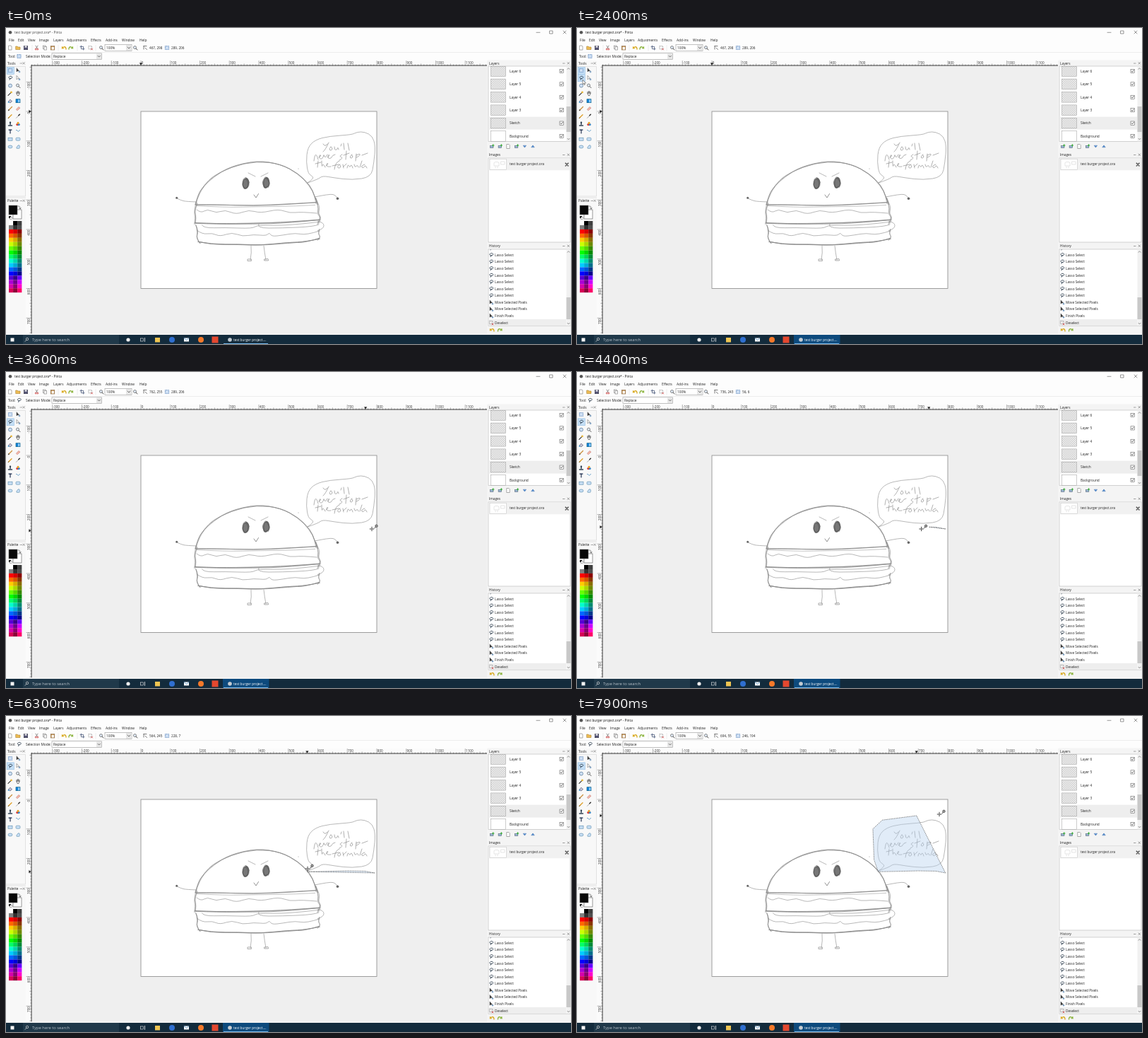
Write an HTML page that moves like this. It is 800 px wide and 447 px high and loops after 8000 ms.

```html
<!DOCTYPE html>
<html lang="en">
<head>
<meta charset="utf-8">
<title>Lasso selection</title>
<style>
html, body { margin: 0; width: 100%; height: 100%; overflow: hidden; background: #efefef; }
svg { display: block; width: 100vw; height: 100vh; }
text { font-family: "Open Sans", "Noto Sans", sans-serif; white-space: pre; }
</style>
</head>
<body>
<svg id="stage" viewBox="0 0 800 447" xmlns="http://www.w3.org/2000/svg"></svg>
<script>
const SCALE = 0.4175, LEFT = 191, TOP = 118;
const px = x => LEFT + x * SCALE, py = y => TOP + y * SCALE;

let seed = 7;
const rnd = () => (seed = seed * 16807 % 2147483647) / 2147483647;

// Markup helpers
const rect = (x, y, w, h, fill, stroke = 'none', sw = .6) =>
  `<rect x="${x}" y="${y}" width="${w}" height="${h}" fill="${fill}" stroke="${stroke}" stroke-width="${sw}"/>`;
const dot = (x, y, r, fill, stroke = 'none') =>
  `<circle cx="${x}" cy="${y}" r="${r}" fill="${fill}" stroke="${stroke}" stroke-width=".7"/>`;
const text = (x, y, str, size = 4.8, fill = '#222', extra = '') =>
  `<text x="${x}" y="${y}" font-size="${size}" fill="${fill}" ${extra}>${str}</text>`;
const path = (d, stroke = '#333', w = .7, fill = 'none') =>
  `<path d="${d}" stroke="${stroke}" stroke-width="${w}" fill="${fill}" stroke-linejoin="round" stroke-linecap="round"/>`;
const at = (x, y, body, id = '') => `<g ${id && `id="${id}"`} transform="translate(${x} ${y})">${body}</g>`;

const parse = s => s.split(' ').map(p => p.split(',').map(Number));
function curve(str, jitter = 0) {
  const p = parse(str).map(([x, y]) => [x + (rnd() - .5) * jitter, y + (rnd() - .5) * jitter]);
  let d = 'M' + p[0];
  for (let i = 1; i < p.length - 1; i++) {
    const end = i < p.length - 2 ? [(p[i][0] + p[i + 1][0]) / 2, (p[i][1] + p[i + 1][1]) / 2] : p[i + 1];
    d += `Q${p[i]} ${end}`;
  }
  return p.length < 3 ? d + 'L' + p[1] : d;
}
function sketch(str, passes = 1, jitter = 0, w = .6, color = '#888') {
  let out = '';
  while (passes--) out += path(curve(str, jitter), color, w);
  return out;
}

// Icons, centred on 0,0
const icon = {
  lasso: path('M-1 2.5 0 .5M0 .7C-4 .5-2-3 1-2.6 4-2 3 1 0 .7', '#234', .8),
  marquee: `<rect x="-2.6" y="-2.4" width="5.2" height="4.8" fill="#cfe0f4" stroke="#36a" stroke-width=".7" stroke-dasharray="1 .6"/>`,
  oval: dot(0, 0, 2.5, '#cfe0f4', '#579'),
  move: path('M-2-3V2L-.7.8 1.5.8Z', '#333', .4, '#333') + path('M1 2H3M2 1V3', '#47a'),
  moveSel: path('M-2-3V2L-.7.8 1.5.8Z', '#555', .5, '#fff') + path('M1 2H3M2 1V3', '#47a'),
  zoom: dot(-.5, -.5, 2, '#e4eefa', '#555') + path('M1 1 3 3', '#555', 1),
  wand: path('M-3 3 1-1', '#333', 1.1) + dot(1.5, -1.5, 1.4, '#e8b83a'),
  pan: path('M-2 0V-2M-.7-.5V-3M.7-.5V-3M2 0V-2M-2 0-1 3H1L2 0Z', '#555', .8, '#fff'),
  bucket: path('M-2 0 0-2 2.5.5 0 2.5Z', '#446', .7, '#ccd') + dot(-2.4, 1.7, .9, '#28c'),
  gradient: rect(-3, -2.5, 6, 5, '#1584d8', '#057') + rect(0, -2, 2.5, 4, '#8cc8f4'),
  brush: path('M-2.5 2.5 2.5-2.5', '#c98b35', 1.2) + dot(-2.2, 2.2, 1, '#555'),
  eraser: path('M-2.5 1 1-2.5 3-.8-.8 2.6Z', '#b66', .5, '#f3b9a8'),
  pencil: path('M-2.5 2.5 2-2', '#e0a22e', 1.4) + path('M-2.8 2.8-2 2', '#333', .8),
  picker: path('M-2.5 2.5 1-1', '#aaa', 1) + path('M.8-1 2.4-2.6', '#333', 1.5),
  stamp: path('M-2.5 2.5H2.5M0 1V-2', '#345', 1.5) + dot(0, -1.8, 1.2, '#345'),
  recolor: dot(-1, 1, 1.7, '#d33') + dot(1.2, 1, 1.6, '#38c') + dot(0, -1.2, 1.6, '#e9a52a'),
  type: path('M-2-2.3H2M0-2.3V2.5', '#124', 1.1),
  line: path('M-2.5-2C0-3-1 3 2.5-2', '#48b', .8),
  box: rect(-3, -2, 6, 4, '#c9dff5', '#58a'),
  round: `<rect x="-3" y="-2" width="6" height="4" rx="1.3" fill="#c9dff5" stroke="#58a" stroke-width=".6"/>`,
  ellipse: `<ellipse rx="3" ry="2" fill="#c9dff5" stroke="#58a" stroke-width=".6"/>`,
  free: path('M-2 2C-3-1 0 0 0-2 3-3 3 0 2 2Z', '#58a', .6, '#c9dff5'),
  page: path('M-2-3H1L2-2V3H-2Z', '#777', .6, '#fff'),
  folder: path('M-3-2H-1L0-1H3V2.4H-3Z', '#a67a25', .6, '#eebd55'),
  save: rect(-2.7, -2.7, 5.4, 5.4, '#557', '#334') + rect(-1.5, -2.5, 3, 2, '#fff'),
  cut: path('M-1.5-3 1 1M1.5-3-1 1', '#777', .8) + dot(-1.3, 2, 1, 'none', '#c33') + dot(1.3, 2, 1, 'none', '#c33'),
  copy: rect(-2.5, -3, 3.6, 4.5, '#fff', '#777') + rect(-1, -1.5, 3.6, 4.5, '#fff', '#777'),
  paste: rect(-2.7, -2.5, 5.4, 5.5, '#bb8437', '#864') + rect(-1.5, -1.3, 3.4, 3.8, '#fff'),
  undo: path('M3 2C3-2 0-2-2 0', '#d9a91d', 1.3) + path('M-3 1-2.6-2 0 .8Z', '#d9a91d', .4, '#d9a91d'),
  redo: path('M-3 2C-3-2 0-2 2 0', '#8bb33d', 1.3) + path('M3 1 2.6-2 0 .8Z', '#8bb33d', .4, '#8bb33d'),
  crop: path('M-1.6-3V1.6H3M-3-1.6H1.6V3', '#457', .8),
  desel: `<rect x="-2.6" y="-2.4" width="4.6" height="4.2" fill="none" stroke="#777" stroke-width=".7" stroke-dasharray="1 .7"/>` + path('M1 1 3 3M3 1 1 3', '#c33'),
  pos: path('M-2-2.5V2M-2-2.5H2M0 0 2.5 2.5', '#444'),
  add: rect(-2.5, -1, 4.5, 3, '#9cb6d6', '#567') + path('M.5-1.5H3M1.8-2.8V-.3', '#3a3', 1),
  up: path('M-2 1 0-1.6 2 1Z', '#36a', .5, '#4d8ad0'),
  down: path('M-2-1 0 1.6 2-1Z', '#36a', .5, '#4d8ad0')
};
const put = (name, x, y) => at(x, y, icon[name]);

function chrome() {
  let s = rect(0, 0, 800, 447, '#efefef') + rect(0, 0, 800, 46, '#fdfdfd');
  s += dot(6, 6.3, 2.3, '#555') + `<g id="title">${text(12, 8.2, 'test burger project.ora* - Pinta', 4.7, 'inherit')}</g>`;
  s += path('M751 6.3H756M770 4H774V8H770ZM789 4 793 8M793 4 789 8', '#333', .5);
  [['File', 4], ['Edit', 17], ['View', 31], ['Image', 47], ['Layers', 67], ['Adjustments', 86], ['Effects', 120],
   ['Add-ins', 141], ['Window', 164], ['Help', 189]].forEach(([m, x]) => s += text(x, 19, m));
  ['page', 6, 'folder', 17, 'save', 28, 'cut', 43.5, 'copy', 55, 'paste', 66, 'undo', 82, 'redo', 92, 'crop', 108, 'desel', 119.5,
   'zoom', 135, 'zoom', 183, 'pos', 197, 'marquee', 228].forEach((n, i, a) => { if (i % 2 < 1) s += put(n, a[i + 1], 28); });
  s += path('M37 24.5V32M74 24.5V32M101 24.5V32M127 24.5V32M0 34.5H800', '#ddd', .5);
  s += rect(140, 23.5, 38, 9, '#fff', '#999') + rect(170, 24, 7.5, 8, '#e6e6e6') + path('M172 27 174 29 176 27', '#444') + text(142, 29.8, '100%');
  s += `<text id="pos" x="203" y="29.8" font-size="4.7" fill="#222"/><text id="size" x="234" y="29.8" font-size="4.7" fill="#222"/>`;
  s += text(3, 41.7, 'Tool:') + at(18.5, 40, '', 'toolIcon') + text(28, 41.7, 'Selection Mode:');
  return s + rect(65, 35.8, 70.5, 8.6, '#fff', '#999') + rect(128, 36.2, 7, 7.8, '#e6e6e6') + path('M130 39.3 131.7 41 133.4 39.3', '#444') + text(67, 41.8, 'Replace');
}

function rulers() {
  let s = rect(28, 46, 653, 7, '#fbfbfb') + rect(28, 46, 8, 386, '#fbfbfb');
  let ticks = '';
  for (let v = -370; v <= 1170; v += 10) {
    const major = v % 100 === 0;
    ticks += `M${px(v)} 53V${major ? 46.5 : v % 50 ? 51.7 : 50.7}`;
    if (major) s += text(px(v) + .8, 51, v, 4.6, '#333');
    if (v < -150 || v > 750) continue;
    ticks += `M36 ${py(v)}H${major ? 29 : v % 50 ? 34.7 : 33.7}`;
    if (major) s += text(0, 0, v, 4.6, '#333', `transform="translate(33.6 ${py(v) + .8}) rotate(-90)" text-anchor="end"`);
  }
  s += path(ticks, '#444', .4) + path('M36 53H681M36 53V432', '#222', .9);
  return s + at(0, 0, path('M-1.8 49.5H1.8L0 52.5Z', '#111', .2, '#111'), 'markX') + at(0, 0, path('M32.5-1.8V1.8L35.5 0Z', '#111', .2, '#111'), 'markY');
}

function toolbox() {
  let s = rect(0, 46, 28, 388, '#f8f8f8') + text(2, 51.8, 'Tools') + text(2, 246, 'Palette');
  s += path('M20 50H23M24 48.6 26.5 51.2M26.5 48.6 24 51.2M20 244.5H23M24 243 26.5 245.6M26.5 243 24 245.6', '#555', .5);
  s += path('M0 54.5H27.5V238H0M0 240H27.5', '#ccc', .5);
  s += rect(1.2, 55.3, 10.3, 10, '#c4def5', '#8ab8e0', .5).replace('<rect', '<rect id="selBg"');
  s += rect(1.2, 65.8, 10.3, 10, '#c4def5', '#8ab8e0', .5).replace('<rect', '<rect id="lassoBg"');
  'marquee move lasso moveSel oval zoom wand pan bucket gradient brush eraser pencil picker stamp recolor type line box round ellipse free'
    .split(' ').forEach((n, i) => s += put(n, i % 2 ? 17 : 6, 60 + (i >> 1) * 10.8));
  s += rect(10, 257, 12, 13, '#fff', '#555') + rect(4, 251, 12, 13, '#080808', '#666');
  s += path('M17 252C20 252 20 253 20 256M18.8 254.8 20 256 21.2 254.8', '#333', .6) + rect(4, 266, 3, 3, '#111') + rect(5.6, 267.5, 3, 3, '#fff', '#555', .4);
  for (let r = 0; r < 17; r++) for (let c = 0; c < 3; c++) {
    const fill = r < 2 ? ['#fff', '#000', '#404040', '#808080', '#303030', '#505050'][r * 3 + c]
      : `hsl(${(r - 2) * 24} 100% ${[50, 42, 27][(c + (r > 12)) % 3]}%)`;
    s += rect(4 + c * 6.1, 273 + r * 5.95, 6.15, 6, fill);
  }
  return s;
}

function header(y, name) {
  return rect(682, y, 118, 9, '#f4f4f4') + text(684, y + 6.3, name) +
    path(`M788.5 ${y + 4.5}H791M795 ${y + 3}l2.6 2.6m0-2.6l-2.6 2.6`, '#444', .5);
}
function scrollbar(y, h, thumbY, thumbH) {
  return rect(793.5, y, 6, h, '#f1f1f1') + rect(793.5, thumbY, 6, thumbH, '#c8c8c8') +
    path(`M795 ${y + 4}l1.5-1.6 1.5 1.6M795 ${y + h - 4}l1.5 1.6 1.5-1.6`, '#555', .6);
}
function panels() {
  let s = rect(681, 46, 119, 388, '#f4f4f4') + header(45.5, 'Layers') + rect(683, 54, 116, 106.5, '#fff', '#aaa', .5);
  ['Layer 6', 'Layer 5', 'Layer 4', 'Layer 3', 'Sketch', 'Background'].forEach((n, i) => {
    const y = 61 + i * 18.4;
    if (i === 4) s += rect(683.3, y - 9, 110, 18, '#eee');
    s += rect(686.5, y - 7.3, 21, 14.6, i < 5 ? 'url(#check)' : '#fff', '#999', .5).replace(/y="[\d.]+" (.*?)height="[\d.]+"/, i ? '$&' : 'y="54.3" $1height="14"');
    s += text(713, y + 1.8, n) + rect(784, y - 2.6, 5.2, 5.2, '#fff', '#444', .5) + path(`M785.2 ${y}l1.1 1.3 2-2.6`, '#333', .7);
  });
  s += scrollbar(54.3, 106, 111, 36);
  ['add', 'add', 'page', 'add', 'down', 'up'].forEach((n, i) => s += put(n, 688 + i * 11.6, 167.5));
  s += header(175, 'Images') + rect(683, 184, 116, 119, '#fff', '#aaa', .5) + rect(683.3, 184.3, 115.4, 17, '#f1f1f1');
  s += rect(685, 185.2, 23.5, 15, '#fff', '#bbb', .5) + path('M691 194V191C691 189 698 189 698 191V195H691M701 189H706V193H701ZM693 196V198M696 196V198', '#bbb', .4);
  s += text(713, 194.3, 'test burger project.ora', 4.7) + path('M792.3 191.2 796 195M796 191.2 792.3 195', '#555', 1.6);
  s += header(304, 'History') + rect(683, 313, 116, 108.5, '#fff', '#aaa', .5) + rect(683.3, 412, 110, 9.3, '#eee');
  const history = [...Array(7).fill('Lasso Select'), 'Move Selected Pixels', 'Move Selected Pixels', 'Finish Pixels', 'Deselect'];
  s += `<g clip-path="url(#hist)">${put('lasso', 687, 311.5)}${text(692, 313.2, 'Lasso Select')}</g>`;
  history.forEach((n, i) => {
    const y = 321.2 + i * 9.57;
    s += put(i < 7 ? 'lasso' : i < 10 ? 'move' : 'desel', 687, y) + text(692, y + 1.7, n, 4.75);
  });
  return s + scrollbar(313.3, 108, 381, 31) + put('undo', 688, 427) + put('redo', 699.5, 427);
}

function drawing() {
  let s = rect(191, 118, 334, 250.5, '#fff', '#888', .8);
  const bun = '269,249 272,236 280,223 293,210 318,196 355,188 389,193 414,206 430,223 437,238 440,249';
  s += sketch(bun, 3, 2.3, .65);
  s += sketch('268,250 300,250 350,251 400,249 440,247', 2, 1.6, .8);
  s += sketch('270,252 310,254 360,253 410,252 438,250', 1, 1, .5);
  s += sketch('270,248 266,258 269,268 268,277', 3, 2.2, .6) + sketch('439,240 444,253 441,262 446,268 442,277', 3, 2.6, .6);
  s += sketch('270,257 276,262 285,256 298,262 310,257 326,264 344,257 360,262 386,256 402,262 418,260 440,262');
  s += sketch('268,276 300,277 350,277 400,275 444,271', 3, 2, .75);
  s += sketch('277,279 279,283 310,282 350,284 356,279 400,280 443,274', 1, .8);
  s += sketch('358,277 354,283 390,283 436,281 443,278') + sketch('441,273 450,275 450,284 441,287');
  s += sketch('270,286 278,292 292,290 303,295 320,289 335,295 350,292 369,294 373,289 376,295 392,293 410,290 425,293 444,287');
  s += sketch('269,279 272,287 269,297 274,304', 3, 2, .6) + sketch('444,285 441,291 445,296 441,300', 2, 2, .6);
  s += sketch('272,303 290,306 330,306 360,307 400,304 425,303 444,298', 3, 1.8, .75);
  for (const [x, y] of [[339.5, 220], [368.3, 219]]) {
    s += `<ellipse cx="${x}" cy="${y}" rx="4.6" ry="8" fill="#777" transform="rotate(8 ${x} ${y})"/>`;
    let d = `M${x} ${y - 8}`;
    for (let a = 0; a < 20; a += .6) d += `L${x + Math.cos(a) * 4.8 * (.6 + rnd() * .5)} ${y + Math.sin(a) * 8 * (.7 + rnd() * .4)}`;
    s += path(d, '#555', .5);
  }
  s += sketch('343,205 353,210') + sketch('361,210 371,205') + path('M351 236 354 240 357.5 234.5', '#777', .8);
  s += sketch('242,241 248,244 256,245.5 270,246') + dot(241.7, 240.2, 1.5, '#666') + sketch('437,239 447,237 460,235 466,236 469,240') + dot(469.5, 241.2, 1.8, '#666');
  s += sketch('347,308 348,318 346,328') + path('M347 327H342V329.5H347Z', '#777', .6) + sketch('365,308 366,318 368,328') + path('M366 327 371 326.5 371.5 329H366Z', '#777', .6);
  s += dot(414, 199, .5, '#888');
  s += sketch('427,219 436,213 433,209 428,206 425,190 427,169 438,158 458,153 490,151 497,147 508,147 519,153 523,167 521,190 517,211 490,215 465,212 448,209 442,214 427,219');
  const words = [
    '449,164 452,169 455,164', '457,162 452,173 449,175', '460,168 457,171 460,174 463,170 460,168', '465,168 465,173 469,172 470,168 471,172',
    '475,164 474,167', '478,163 479,172', '484,163 486,173',
    '436,188 437,180 440,179 442,186', '443,183 447,181 444,179 443,184 448,186 450,180', '450,180 452,186 455,179', '455,183 459,180 456,179 456,185 461,184 462,180 466,179',
    '476,179 471,181 478,184 472,187', '482,174 481,186', '478,180 486,177', '490,179 486,182 489,185 492,181 489,179', '496,178 495,188', '496,180 502,177 500,182 496,183', '512,177 504,180',
    '442,188 441,197', '438,192 446,190', '447,188 447,198 449,191 452,197', '453,195 457,192 454,191 454,197 460,196',
    '472,188 466,190 465,200', '462,195 471,193', '473,193 468,196 472,199 475,195 472,193', '477,193 478,198', '478,196 482,192',
    '483,198 484,192 487,198 489,192 491,198', '493,193 494,198 498,193 499,197', '504,188 501,197', '508,193 502,195 506,199 509,193 511,198'];
  return s + words.map(w => sketch(w, 1, 0, .65, '#858585')).join('');
}

function taskbar() {
  let s = rect(0, 432.5, 800, 1.5, '#f4f4f4') + rect(0, 434, 800, 13, '#132b3c') + rect(24, 434, 136, 13, '#20394a');
  s += rect(6.5, 438.5, 5, 5, '#f4f4f4') + dot(30, 440, 1.7, 'none', '#ddd') + path('M28.8 441.4 27 443.4', '#ddd', .7);
  s += text(37, 443.2, 'Type here to search', 5.8, '#b8c2ca') + dot(173, 441, 2.6, '#eee');
  s += rect(190.5, 439, 4, 4, 'none', '#eee') + path('M196.5 438.5V443.5', '#eee', .8);
  s += rect(211, 438, 7, 6.5, '#f0c552') + dot(235, 441, 4, '#2f6fd0') + rect(252, 438.5, 7, 5, '#fff') + path('M252 438.5 255.5 441.5 259 438.5', '#2777b8', .7);
  s += dot(276, 441, 4, '#f5792a') + rect(291.5, 436.5, 9, 9, '#e5482f');
  s += rect(307, 434, 65.5, 13, '#0d4a7d').replace('<rect', '<rect id="task"') + rect(308, 446, 63, 1, '#76b9ed');
  return s + dot(317, 441, 2.8, '#c5ccd2') + text(322, 442.8, 'test burger project....', 4.8, '#fff');
}

const stage = document.getElementById('stage');
stage.innerHTML = `<defs><pattern id="check" width="3" height="3" patternUnits="userSpaceOnUse">
  ${rect(0, 0, 3, 3, '#f4f4f4')}${rect(0, 0, 1.5, 1.5, '#ccc')}${rect(1.5, 1.5, 1.5, 1.5, '#ccc')}</pattern>
  <clipPath id="hist">${rect(683, 313.3, 110, 108, '#fff')}</clipPath></defs>` +
  chrome() + rulers() + toolbox() + drawing() +
  `<path id="selection" fill="#b4d0ee" fill-opacity=".4" stroke="#444" stroke-width=".8" stroke-dasharray="1.2 1.2"/>` +
  panels() + taskbar() + at(0, 0, path('M14 83.3H41V79', '#555', .7), 'tip') +
  at(0, 0, path('M0 0V6L1.4 4.8 2.4 7 3.3 6.6 2.3 4.5 4.2 4.4Z', '#222', .5, '#fff'), 'arrow') +
  at(0, 0, path('M-2.8 0H-.7M.7 0H2.8M0-2.8V-.7M0 .7V2.8', '#111', .8) + dot(6.5, -4.2, 1.7, '#aaa', '#222') + path('M5-2.6 4-1', '#222', .8), 'cross');
const el = Object.fromEntries([...stage.querySelectorAll('[id]')].map(e => [e.id, e]));

// Keys are [time, x, y]; pointer in stage pixels, pen in image pixels
const pointer = [[1000, 300, 330], [1500, 112, 109], [1700, 110, 104], [2200, 8, 73], [2900, 8, 75], [3100, 8, 75], [3600, 518, 222],
  [3800, 521, 222], [5200, 443, 222], [6300, 427, 216], [6600, 421, 202], [7100, 419, 160], [7400, 436, 146], [7900, 513, 139]];
const hover = [[3300, 100, 60], [3600, 762, 255], [3800, 792, 249]];
const pen = [[3800, 792, 249], [4200, 760, 243], [4700, 700, 242], [5200, 617, 244], [6300, 564, 245], [6700, 550, 205],
  [7200, 546, 100], [7500, 578, 70], [7900, 694, 55]];

function locate(keys, t) {
  const i = keys.findIndex(k => k[0] >= t);
  if (i < 1) return keys.at(i).slice(1);
  const [a, b] = [keys[i - 1], keys[i]], f = (t - a[0]) / (b[0] - a[0]);
  return [a[1] + (b[1] - a[1]) * f, a[2] + (b[2] - a[2]) * f];
}
const show = (e, on) => e.style.display = on ? '' : 'none';
const moveTo = (e, x, y) => e.setAttribute('transform', `translate(${x} ${y})`);

function render(t) {
  const active = t >= 2400, lasso = t >= 3100, inside = t >= 3300, drag = t >= 3800;
  el.title.setAttribute('fill', active ? '#111' : '#444');
  show(el.task, active);
  show(el.selBg, !lasso);
  show(el.lassoBg, t >= 2200);
  el.toolIcon.innerHTML = lasso ? icon.lasso : icon.marquee;
  show(el.tip, t >= 2800 && t < 3000);

  const [cx, cy] = locate(pointer, t), cross = t >= 3200;
  show(el.arrow, t >= 1000 && !cross);
  show(el.cross, cross);
  moveTo(cross ? el.cross : el.arrow, cx, cy);

  const [x, y] = inside ? locate(drag ? pen : hover, t) : [467, 298];
  el.pos.textContent = `${Math.round(x)}, ${Math.round(y)}`;
  moveTo(el.markX, inside ? px(x) : LEFT, 0);
  moveTo(el.markY, 0, inside ? py(y) : TOP);

  let size = '289, 206';
  show(el.selection, drag);
  if (drag) {
    const pts = [...pen.filter(k => k[0] < t).map(k => k.slice(1)), [x, y]];
    const span = i => Math.round(Math.max(...pts.map(p => p[i])) - Math.min(...pts.map(p => p[i])));
    size = `${span(0)}, ${span(1)}`;
    el.selection.setAttribute('d', 'M' + pts.map(([a, b]) => `${px(a)} ${py(b)}`).join('L') + 'Z');
  }
  el.size.textContent = size;
}

const start = performance.now();
function frame() {
  render(Math.floor((performance.now() - start) % 8000 / 100) * 100);
  requestAnimationFrame(frame);
}
frame();
</script>
</body>
</html>
```
